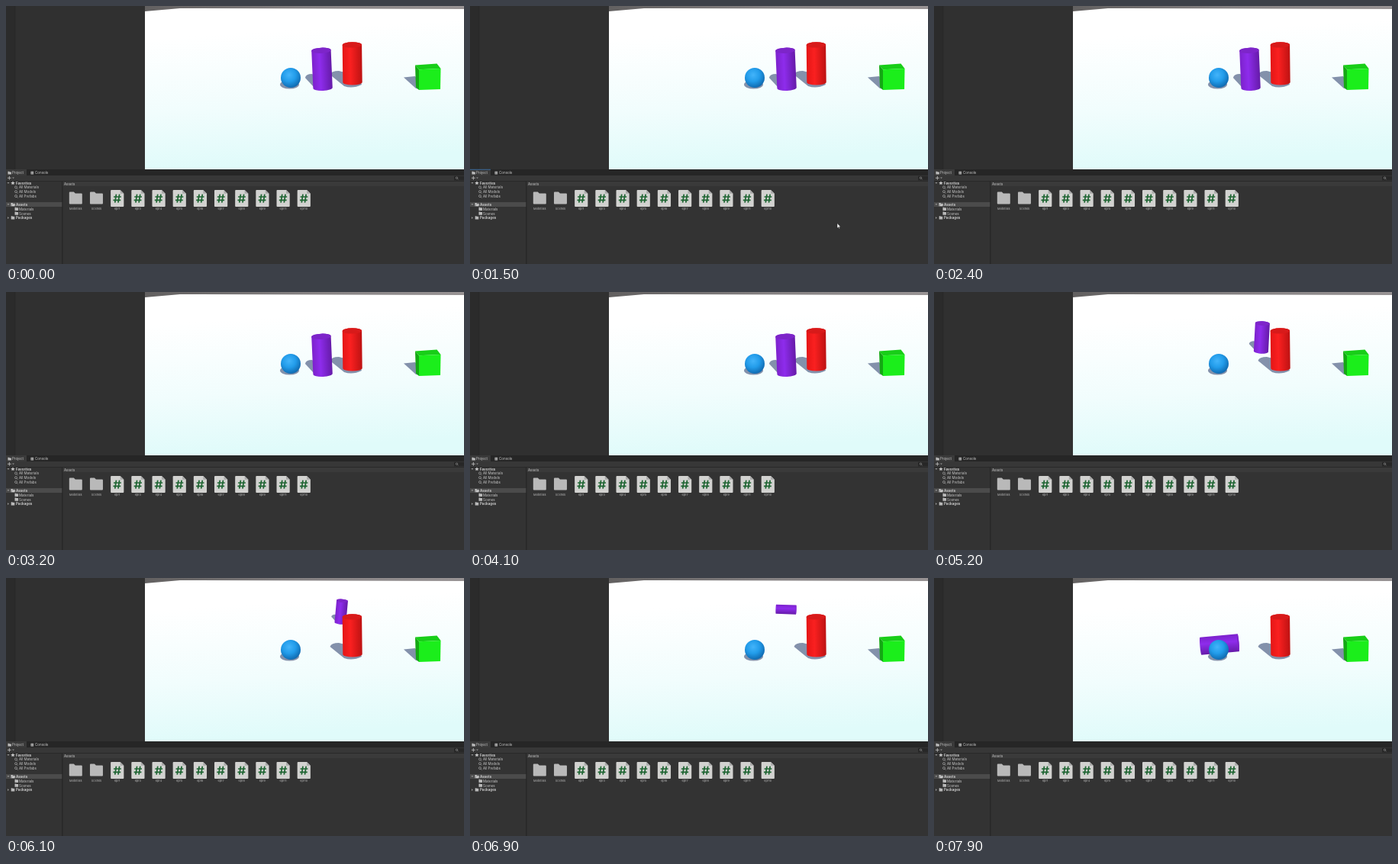
An HTML page that plays this animation: 600x338 px, repeating every 8000 ms.

```html
<!DOCTYPE html>
<html>
<head>
<meta charset="utf-8">
<style>
html, body { margin: 0; width: 100%; height: 100%; overflow: hidden; background: #333; }
svg { display: block; width: 600px; height: 338px; }
text { font-family: Inter, sans-serif; font-size: 4.5px; fill: #c8c8c8; }
.bold { font-weight: 700; }
.label { font-size: 3.8px; text-anchor: middle; fill: #b4b4b4; }
.shadow { fill: #8391ab; }
#focus { animation: focus 8s step-end infinite; }
@keyframes focus {
  0% { visibility: hidden; }
  7.5% { visibility: visible; }
  21.25%, 100% { visibility: hidden; }
}
</style>
</head>
<body>
<svg viewBox="0 0 600 338">
  <defs>
    <linearGradient id="floor" x2="0.12" y2="1">
      <stop offset=".2" stop-color="#fff"/><stop offset=".65" stop-color="#f1fdfd"/><stop offset="1" stop-color="#e0fbfa"/>
    </linearGradient>
    <linearGradient id="wall">
      <stop stop-color="#626060"/><stop offset=".5" stop-color="#858182"/><stop offset="1" stop-color="#989394"/>
    </linearGradient>
    <linearGradient id="violet">
      <stop stop-color="#7c22cc"/><stop offset=".4" stop-color="#8e2cec"/><stop offset="1" stop-color="#651ba8"/>
    </linearGradient>
    <linearGradient id="red">
      <stop stop-color="#e41616"/><stop offset=".4" stop-color="#fa2020"/><stop offset="1" stop-color="#bd1212"/>
    </linearGradient>
    <radialGradient id="blue" cx=".42" cy=".36" r=".66">
      <stop stop-color="#43b4fa"/><stop offset=".5" stop-color="#229cea"/><stop offset="1" stop-color="#0f68ae"/>
    </radialGradient>
    <path id="cast" d="M-29.5-13Q-28-18-18-18L6-12 12 0Q0 6-11 2Z"/>
    <path id="arrow" d="M0 0V6.6L1.6 5.2 2.6 7.4 3.6 6.9 2.6 4.8H4.7Z"/>
    <g id="folder">
      <path d="M-8.5-7.5q0-1 1-1h5l2 2h8q1 0 1 1v12q0 1-1 1h-15q-1 0-1-1Z" fill="#b9b9b9"/>
    </g>
    <g id="script">
      <path d="M-8.5-10q0-1 1-1H4L8.7-6.3V10q0 1-1 1H-7.5q-1 0-1-1Z" fill="#d2d2d0"/>
      <path d="M4-11V-6.3H8.7Z" fill="#a9a9a9"/>
      <path d="M-1.2-5.4-2.9 5.6M3-5.4 1.3 5.6M-4.6-2H5.2M-5.2 2.4H4.6" stroke="#1d6431" stroke-width="1.7"/>
    </g>
    <g id="lens" fill="none" stroke="#bdbdbd" stroke-width=".6">
      <circle r="1.5"/><path d="M1.1 1.1 2.5 2.5"/>
    </g>
  </defs>

  <rect width="600" height="338" fill="#333"/>
  <rect width="11.5" height="214" fill="#2b2b2b"/>
  <rect x="11.5" width="1" height="214" fill="#222"/>
  <rect x="12.5" width="169.5" height="214" fill="#303030"/>

  <rect x="182" width="418" height="214" fill="url(#floor)"/>
  <path d="M182 0H600V4L228 3 182 7Z" fill="url(#wall)"/>

  <g class="shadow">
    <use href="#cast" transform="translate(454 103)"/>
    <path d="M521 93.5 536 92 542 100V109L537 108Z"/>
    <ellipse cx="371.5" cy="103" rx="12.5" ry="5.5"/>
    <use href="#cast" id="cast-violet"/>
  </g>
  <g id="tube"><path fill="url(#violet)"/><ellipse fill="#7d25c9"/></g>
  <circle cx="373" cy="94" r="13" fill="url(#blue)"/>
  <g id="post" transform="translate(453.7 75.4) rotate(-.7)"><path fill="url(#red)"/><ellipse fill="#d81a1a"/></g>
  <path d="M536 77.5 564.5 75.5 569.5 82 541 83.2Z" fill="#18ce18"/>
  <path d="M536 77.5 541 83.2V110L537 106.5Z" fill="#14a814"/>
  <path d="M541 83.2 569.5 82 569 109 541 110Z" fill="#1bee1b"/>

  <rect y="214" width="600" height="8" fill="#262626"/>
  <rect y="214" width="27" height="8" fill="#3a3a3a"/>
  <rect y="222" width="600" height="7.5" fill="#373737"/>
  <rect x="587" y="222.8" width="13" height="5.6" fill="#272727"/>
  <use href="#lens" transform="translate(590.5 225.2) scale(.8)"/>
  <rect y="229.3" width="600" height=".8" fill="#262626"/>
  <rect x="74" y="230" width="526" height="6" fill="#3a3a3a"/>
  <rect y="257" width="74" height="6" fill="#4b4b4b"/>
  <rect x="73.4" y="230" width=".9" height="108" fill="#222"/>

  <path d="M2.5 216.7h1.8l.6.7h2v3.2h-4.4ZM32.5 216.7h3.6v3.8h-3.6Z" fill="#bbb"/>
  <path d="M33 218h2.6M33 219.2h2.6" stroke="#333" stroke-width=".4"/>
  <path d="M2 225.3h4.8M4.4 222.9v4.8" stroke="#c4c4c4" stroke-width=".8"/>
  <path d="M8 224.5h3l-1.5 1.8ZM1.5 231h3l-1.5 2ZM1.5 259h3l-1.5 2ZM2 276v3l2-1.5Z" fill="#8f8f8f"/>
  <path d="M9 229.2l.8 1.7 1.8.2-1.3 1.3.3 1.8-1.6-.9-1.6.9.3-1.8-1.3-1.3 1.8-.2Z" fill="#c8c8c8"/>
  <path d="M6.5 258h2l.6.7h2.6v.8H8l-1 2.7h-.5ZM8.2 259.8h4l-.9 2.4H7.3Z" fill="#c8c8c8"/>
  <g id="tree"></g>
  <g id="files"></g>

  <g id="focus">
    <rect y="213.8" width="27" height=".9" fill="#3b6ea5"/>
    <use href="#arrow" x="481" y="284.6" fill="#fff" stroke="#111" stroke-width=".5"/>
  </g>
</svg>
<script>
const $ = id => document.getElementById(id);
const text = (s, x, y, cls = '') => `<text x="${x}" y="${y}" class="${cls}">${s}</text>`;
const icon = (id, x, y, k = 1) => `<use href="#${id}" transform="translate(${x} ${y}) scale(${k})"/>`;

$('tree').innerHTML =
  text('Project', 8, 220.1) + text('Console', 38, 220.1) + text('Assets', 76, 234.7) +
  text('Favorites', 13, 233.7, 'bold') + text('Assets', 13, 261.8, 'bold') + text('Packages', 13, 279.1, 'bold') +
  ['Materials', 'Models', 'Prefabs'].map((s, i) =>
    icon('lens', 13, 237.4 + i * 5.8) + text('All ' + s, 17, 239.4 + i * 5.8)).join('') +
  ['Materials', 'Scenes'].map((s, i) =>
    icon('folder', 13.8, 266 + i * 5.8, .27) + text(s, 17, 267.7 + i * 5.8)).join('') +
  icon('folder', 9, 277.5, .27);

$('files').innerHTML =
  ['Materials', 'Scenes', ...[1, 3, 4, 5, 6, 7, 8, 9, 11, 10].map(n => 'epr' + n)].map((s, i) => {
    const x = 91.3 + i * 27.17;
    return icon(i < 2 ? 'folder' : 'script', x, 252) + text(s, x, 267.3, 'label');
  }).join('');

// Upright cylinder around the origin; ry is the visible depth of its caps
function shapeCylinder(group, ry) {
  const r = 12.7, h = 28.2 - ry, [body, cap] = group.children;
  body.setAttribute('d', `M${-r} ${-h}A${r} ${ry} 0 0 1 ${r} ${-h}V${h}A${r} ${ry} 0 0 1 ${-r} ${h}Z`);
  for (const [k, v] of Object.entries({ cy: -h, rx: r, ry })) cap.setAttribute(k, v);
}

// time, sideways position, depth, tilt in degrees
const path = [
  [0, 23, 1, -2.5], [4400, 23, 1, -2.5], [5200, 51, 1.33, 3], [6100, 82, 1.7, 5],
  [6900, 48, 2.08, 92], [7000, 27, 2.07, 91], [7900, -18.7, 1.1, 85], [8000, -22, 1.05, 85]
];

function poseAt(t) {
  const i = path.findIndex(p => p[0] > t), a = path[i - 1], b = path[i];
  const k = (t - a[0]) / (b[0] - a[0]);
  return a.map((v, j) => v + (b[j] - v) * k);
}

function draw(now) {
  const [, side, depth, tilt] = poseAt(now % 8000);
  const up = Math.abs(Math.cos(tilt * Math.PI / 180));
  const x = 391 + side / depth, bottom = 122 / depth - 11;
  const y = bottom - (12.9 + 15.3 * up) / depth;
  shapeCylinder($('tube'), .8 + 2.9 * up);
  $('tube').setAttribute('transform', `translate(${x} ${y}) rotate(${tilt}) scale(${1 / depth})`);
  $('cast-violet').setAttribute('transform',
    `translate(${x} ${bottom - 4 / depth}) scale(${.75 / depth} ${up / depth})`);
  requestAnimationFrame(draw);
}

shapeCylinder($('post'), 3.7);
draw(performance.now());
</script>
</body>
</html>
```
